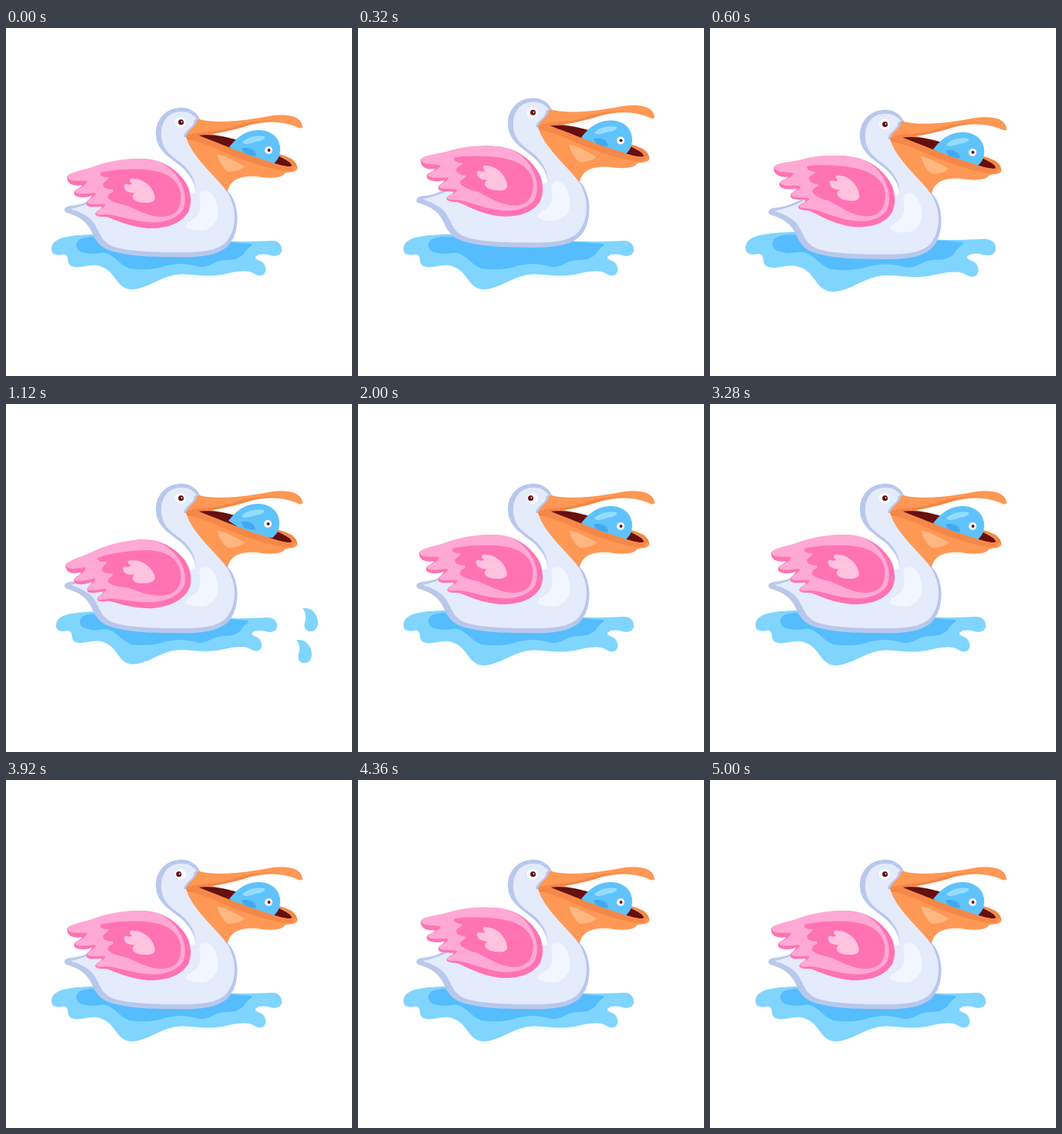
Write an HTML page that moves like this. It is 448x450 px and loops after 5040 ms.

```html
<!DOCTYPE html>
<html lang="en">
<head>
<meta charset="utf-8">
<title>Pelican</title>
<style>
html, body { margin: 0; width: 100%; height: 100%; overflow: hidden; background: #fff; }
svg { display: block; width: 100%; height: 100%; }
</style>
</head>
<body>
<svg viewBox="0 0 448 450">
  <defs>
    <path id="drop" d="M384 264C394 263 402 268 404 282C404 290 400 294 394 294C388 294 385 289 387 282C389 274 388 269 384 264Z"/>
  </defs>

  <g id="drops" fill="#7fd5fd">
    <use href="#drop"/>
    <use href="#drop" x="-8" y="41"/>
  </g>

  <g id="water">
    <path fill="#7fd5fd" d="M59 286C59 275 70 271 85 269C102 267 125 266 150 267L270 275C300 277 325 276 344 275C353 275 358 281 357 288C356 294 349 296 342 294C335 292 328 292 324 295C320 299 328 300 332 303C338 308 338 318 331 320C323 321 322 316 314 315C300 313 288 318 272 320C250 322 235 316 215 320C195 325 182 337 163 338C148 338 144 325 134 315C126 308 118 306 110 307C98 308 92 311 85 308C78 305 82 298 78 294C74 291 70 295 64 293C61 292 59 290 59 286Z"/>
    <path fill="#55bdfd" d="M91 281C91 274 98 271 108 270L200 272L290 277L318 279C320 282 311 285 308 292C302 299 292 300 284 300C268 301 265 310 250 309C235 304 220 304 205 308C190 313 175 313 160 311C145 305 140 293 128 291C118 290 112 294 104 291C95 290 91 286 91 281Z"/>
  </g>

  <g id="bird">
    <path fill="#b8c8ec" d="M252 119C246 108 238 103 227 103C208 103 194 117 194 136C194 158 212 167 224 177C238 188 246 202 245 212L236 222L180 238L118 219C106 225 96 229 82 230C74 232 74 237 79 239C90 242 97 246 104 253C113 263 113 276 128 285C145 293 175 296 210 296C245 297 270 296 285 284C297 274 301 255 299 238C297 225 293 216 286 210L250 150Z"/>
    <path fill="#e4ebfb" d="M248 119C243 111 235 108 227 108C211 108 201 120 201 137C201 157 214 165 226 174C240 186 247 200 245 212L180 238L122 220C110 227 96 231 84 234C98 239 109 244 115 254C122 266 124 276 137 282C160 290 200 290 230 290C262 290 278 286 287 274C296 262 298 245 294 230C291 220 288 214 284 209L240 150Z"/>
    <path fill="#b8c8ec" d="M230 141C231 132 243 129 243 121C244 117 248 117 252 119L250 140Z"/>
    <path fill="#f2f6fe" d="M252 213C258 207 268 212 272 225C278 240 274 256 258 261C248 263 236 261 232 256C234 250 246 248 250 238C254 228 248 220 252 213Z"/>

    <path fill="#f58748" d="M233 139C245 134 258 135 275 139C305 144 335 158 360 165C373 169 378 176 377 182C376 186 368 187 360 184L250 150Z"/>
    <path fill="#65100f" d="M248 139C270 136 295 142 320 153C345 162 369 171 370 178C366 181 352 179 340 176C310 168 275 154 248 139Z"/>

    <g id="fish">
      <path fill="#5fc2fb" d="M289 154C298 143 306 134 325 132C343 131 355 142 355 157C355 165 352 171 346 176L320 174Z"/>
      <path fill="#93dcff" d="M306 148C311 142 322 138 334 140C338 143 331 146 324 147C316 149 309 152 306 148Z"/>
      <path fill="#3fa9f2" d="M305 156C314 153 323 157 324 166L310 164Z"/>
      <circle cx="340" cy="158" r="5" fill="#fff"/>
      <circle cx="340.5" cy="158" r="2" fill="#65100f"/>
    </g>

    <path fill="#fe9854" d="M233 139C244 136 250 139 262 144C290 155 318 166 344 174C358 178 369 181 373 178C377 181 377 185 371 186C367 187 364 186 361 188C358 194 342 195 325 192C305 191 290 195 287 212C268 188 238 164 233 139Z"/>
    <path fill="#f58748" d="M233 139C244 136 250 139 262 144C290 155 318 166 344 174C355 178 366 181 373 178C374 182 369 186 361 185C330 181 290 164 262 152C252 148 242 145 234 144Z"/>
    <path fill="#ffb77f" d="M273 163C283 165 298 173 309 179C305 183 296 186 288 186C281 183 275 172 273 163Z"/>
    <path fill="#fe9854" d="M234 139C236 130 247 128 247 119C250 117 254 119 260 120C290 123 318 118 340 114C365 110 383 114 384 128C383 131 379 129 374 127C355 119 330 121 310 127C290 133 270 138 252 138Z"/>
    <path fill="#f58748" d="M234 139C250 132 275 136 296 127C315 121 335 118 356 121C336 119 322 123 310 127C290 133 270 138 252 138Z"/>

    <circle cx="226" cy="122" r="7" fill="#fff"/>
    <g id="pupil">
      <circle cx="226.6" cy="121.7" r="3.5" fill="#65100f"/>
      <circle cx="227.6" cy="121.2" r=".9" fill="#fff"/>
    </g>

    <g id="wing">
      <path fill="#ff73b3" d="M79 193C80 187 100 184 112 180C130 173 150 169 176 169C202 170 218 181 230 196C240 209 241 225 237 236C230 250 212 260 184 259C160 257 145 249 130 244C122 244 114 244 116 239C118 235 124 235 124 231C116 231 104 233 104 227C104 222 111 221 111 217C102 220 88 220 88 213C88 208 98 207 98 203C90 205 79 203 79 193Z"/>
      <path fill="#ffa9d4" d="M79 192C82 187 100 184 112 180C130 173 150 169 176 169C190 170 201 173 210 180C226 193 236 214 230 233C224 246 204 253 183 251C160 249 142 241 128 241C122 242 115 242 117 238C119 235 128 233 129 228C120 227 108 230 105 226C106 221 116 219 116 213C106 213 94 217 89 212C91 207 105 204 105 198C96 196 84 201 79 192Z"/>
      <path fill="#ff73b3" d="M122 187C135 183 160 182 180 183C205 185 222 194 226 212C228 230 222 243 204 244C185 245 170 235 155 229C143 227 130 222 132 217C134 213 139 213 139 209C131 209 124 206 126 201C128 197 133 197 133 193C127 193 121 192 122 187Z"/>
      <path fill="#ffc3e0" d="M153 203C156 200 161 205 163 201C158 197 160 194 166 195C180 195 192 208 193 220C191 228 180 226 171 225C163 222 162 217 167 213C160 214 152 211 153 203Z"/>
    </g>
  </g>
</svg>
<script>
const LOOP = 5040;
const [drops, water, bird, fish, pupil, wing] =
  ['drops', 'water', 'bird', 'fish', 'pupil', 'wing'].map(id => document.getElementById(id));

// Eased value at time t through [time, value] stops.
function track(t, ...stops) {
  let [t0, v0] = stops[0];
  for (const [t1, v1] of stops) {
    if (t < t1) {
      const u = Math.max(0, (t - t0) / (t1 - t0));
      return v0 + (v1 - v0) * u * u * (3 - 2 * u);
    }
    t0 = t1;
    v0 = v1;
  }
  return v0;
}

const move = (el, x, y, rest = '') => el.setAttribute('transform', `translate(${x} ${y}) ${rest}`);
const scaleAt = (s, x, y) => `translate(${x} ${y}) scale(${s}) translate(${-x} ${-y})`;

function draw(now) {
  const t = now % LOOP;

  move(bird, 0, track(t, [0, 0], [280, -13], [640, 3.3], [900, 0]));
  move(water, 0, 0, scaleAt(track(t, [460, 1], [780, 1.21], [1120, .96], [1400, 1]), 208, 302));

  const angle = track(t, [0, 0], [560, 5.8], [1100, -6], [1500, 0],
    [3920, 0], [4200, 5.8], [4700, -2.5], [5000, 0]);
  wing.setAttribute('transform', `rotate(${angle} 236 222)`);

  const wiggle = track(t, [900, 0], [1120, 1], [1350, 0]);
  move(fish, -wiggle, -3 * wiggle);
  move(pupil, track(t, [1700, 0], [1850, -3], [2150, -3], [2300, 0],
    [3500, 0], [3650, -3], [3900, -3], [4050, 0]), 0);

  move(drops,
    track(t, [700, -60], [1120, 0], [1500, 2]),
    track(t, [700, -8], [900, -16], [1120, 0], [1500, 6]),
    scaleAt(track(t, [700, 0], [1050, 1]), 394, 300));
  drops.setAttribute('opacity', track(t, [1180, 1], [1500, 0]));
}

function frame() {
  draw(performance.now());
  requestAnimationFrame(frame);
}
frame();
</script>
</body>
</html>
```
